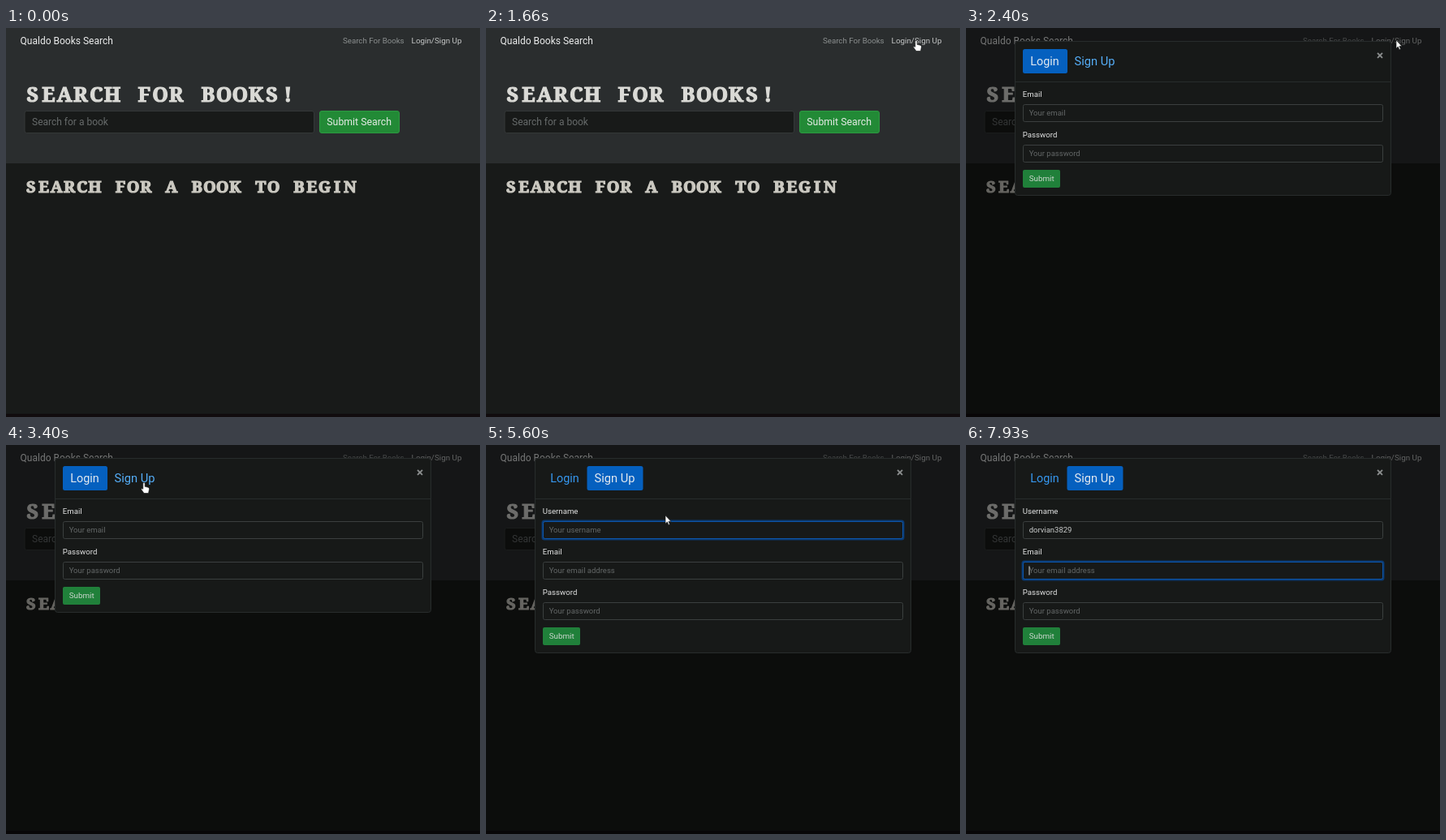
Write an HTML page that moves like this. It is 584 px wide and 480 px high and loops after 8000 ms.

```html
<!DOCTYPE html>
<html lang="en">
<head>
<meta charset="utf-8">
<title>Book search</title>
<style>
html, body { margin: 0; width: 100%; height: 100%; overflow: hidden; background: #181a19; }
svg { display: block; width: 584px; height: 480px; font: 9.5px Roboto, "Open Sans", sans-serif; }
text { white-space: pre; }
.slab { font-family: "Noto Serif", serif; font-weight: 900; text-anchor: middle; stroke-width: 1.2; }
.label { fill: #e2e3e3; font-size: 9.65px; }
.hint { fill: #636767; }
.field { fill: #171918; stroke: #3b3f3f; }
.pill { font-size: 14.4px; }

/* One shared 8 s clock */
.a { animation: 8s linear infinite; }
.fade { animation-name: fade; }
.drop { animation-name: drop; }
.leave { animation-name: leave; }
.enter { animation-name: enter; }
.before { animation-name: before; }
.after { animation-name: after; }
.short { animation-name: short; }
.tall { animation-name: tall; }
.focus1 { animation-name: focus1; }
.focus2 { animation-name: focus2; }
.move { animation-name: move; }
.arrow { animation-name: arrow; animation-timing-function: step-end; }
.hand { animation-name: hand; animation-timing-function: step-end; }

@keyframes fade { 0%, 21.25% { opacity: 0 } 23.125%, 100% { opacity: 1 } }
@keyframes drop {
  0%, 21.25% { transform: translateY(-31px); animation-timing-function: ease-out }
  25%, 100% { transform: none }
}
@keyframes before { 0%, 47.5% { opacity: 1 } 47.501%, 100% { opacity: 0 } }
@keyframes after { 0%, 47.5% { opacity: 0 } 47.501%, 100% { opacity: 1 } }
@keyframes short { 0%, 49.375% { opacity: 1 } 49.376%, 100% { opacity: 0 } }
@keyframes tall { 0%, 49.375% { opacity: 0 } 49.376%, 100% { opacity: 1 } }
@keyframes leave { 0%, 47.5% { opacity: 1 } 49.375%, 100% { opacity: 0 } }
@keyframes enter { 0%, 49.375% { opacity: 0 } 51.25%, 100% { opacity: 1 } }
@keyframes focus1 { 0%, 62.5% { opacity: 0 } 64.375%, 95% { opacity: 1 } 96.875%, 100% { opacity: 0 } }
@keyframes focus2 { 0%, 95% { opacity: 0 } 96.875%, 100% { opacity: 1 } }
@keyframes move {
  0%, .75% { transform: translate(440px, 140px); animation-timing-function: ease-in-out }
  10.75%, 11.625% { transform: translate(532px, 97px); animation-timing-function: ease-in-out }
  18.25%, 30% { transform: translate(530px, 15px); animation-timing-function: ease-in-out }
  40.75%, 53.75% { transform: translate(170px, 46px); animation-timing-function: ease-in }
  58% { transform: translate(160px, 94px) }
  69.5% { transform: translate(221px, 94px) }
  70.75%, 92.5% { transform: translate(221px, 76.5px) }
  94.1%, 100% { transform: translate(222px, 95px) }
}
@keyframes arrow {
  0% { opacity: 0 } .75% { opacity: 1 } 17.5% { opacity: 0 } 23.125% { opacity: 1 }
  39.4% { opacity: 0 } 55.5% { opacity: 1 } 58% { opacity: 0 } 69.5% { opacity: 1 }
  94.1%, 100% { opacity: 0 }
}
@keyframes hand {
  0% { opacity: 0 } 17.5% { opacity: 1 } 23.125% { opacity: 0 }
  39.4% { opacity: 1 } 55.5%, 100% { opacity: 0 }
}
</style>
</head>
<body>
<svg viewBox="0 0 584 480">
  <defs>
    <g id="submit">
      <rect x="70" width="46" height="22" rx="2" fill="#20803a"/>
      <text x="77.7" y="14.2" font-size="9.8" fill="#cbd5cd">Submit</text>
    </g>
    <g id="ring" fill="none">
      <rect x="69.5" y="-.5" width="445" height="23" rx="2.5" stroke="#0a3a73" stroke-width="2"/>
      <rect x="70.5" y=".5" width="443" height="21" rx="2" stroke="#0d55a8"/>
    </g>
  </defs>

  <rect width="584" height="480" fill="#181a19"/>
  <rect width="584" height="167" fill="#2a2d2e"/>
  <rect y="476" width="584" height="4" fill="#110c0e"/>
  <text x="17.6" y="20.4" font-size="12" fill="#eceded">Qualdo Books Search</text>
  <text x="415" y="19.3" font-size="9.7" fill="#8b8f8f">Search For Books</text>
  <text x="499.6" y="19.3" font-size="9.85" fill="#c6c8c8">Login/Sign Up</text>
  <text class="slab" y="90.6" font-size="25" fill="#dadad6" stroke="#dadad6">SEARCH FOR BOOKS!</text>
  <rect x="23" y="102.5" width="356.5" height="27" rx="2.5" fill="#181a19" stroke="#343838"/>
  <text x="32" y="120.4" font-size="12" fill="#676b6b">Search for a book</text>
  <rect x="386.5" y="102.5" width="98" height="27" rx="2.5" fill="#228a36" stroke="#2d9b42"/>
  <text x="395.3" y="120.4" font-size="12.3" fill="#e6ece7">Submit Search</text>
  <text class="slab" y="202.6" font-size="20" fill="#cbc9c1" stroke="#cbc9c1">SEARCH FOR A BOOK TO BEGIN</text>

  <rect id="shade" class="a fade" width="584" height="480" fill-opacity=".5"/>

  <g class="a fade"><g class="a drop">
    <g fill="#171918" stroke="#282c2c">
      <rect class="a short" x="60.5" y="16.5" width="463" height="190" rx="3"/>
      <rect class="a tall" x="60.5" y="16.5" width="463" height="240" rx="3"/>
      <path d="M61 66.5H523"/>
    </g>
    <path d="M507 30.8l6 6m0-6l-6 6" stroke="#8c8f8f" stroke-width="1.9"/>

    <g class="a before pill">
      <rect x="70" y="26" width="55" height="30" rx="2.5" fill="#0560bf"/>
      <text x="79.3" y="46" fill="#e3e9f0">Login</text>
      <text x="133.5" y="46" font-size="14.7" fill="#55aef8">Sign Up</text>
    </g>
    <g class="a after pill">
      <rect x="124.5" y="26" width="69" height="30" rx="2.5" fill="#0560bf"/>
      <text x="79.3" y="46" fill="#3698f0">Login</text>
      <text x="133.5" y="46" font-size="14.7" fill="#e3e9f0">Sign Up</text>
    </g>

    <g id="login" class="a leave"><use href="#submit" y="175"/></g>
    <g id="signup" class="a enter"><use href="#submit" y="225"/></g>
    <g class="a focus1"><use href="#ring" y="94"/></g>
    <g class="a focus2"><use href="#ring" y="144"/></g>
    <text id="typed" x="77.7" y="108.4" fill="#c9cbcb"></text>
    <rect id="caret" width="1" height="11" fill="#d8dada"/>
  </g></g>

  <g class="a move" stroke="#101212" stroke-width=".6" fill="#fff">
    <path class="a arrow" d="M0 0V10.2L2.3 8.1 3.9 11.7 5.5 11 3.9 7.5H7Z"/>
    <path class="a hand" d="M-1.2 1Q0-.6 1.2 1V5.3L5.2 6.3Q6.8 6.9 6.5 8.6L5.5 13.5H0L-3.4 8.7Q-3.4 7-1.2 8.3Z"/>
  </g>
</svg>
<script>
const $ = id => document.getElementById(id);

// Headings sit on a fixed pitch, one letter centred in each cell
document.querySelectorAll('.slab').forEach(el => {
  const pitch = el.getAttribute('font-size') * .786;
  el.setAttribute('x', [...el.textContent].map((_, i) => (23 + pitch * (i + .5)).toFixed(2)).join(' '));
});

function addFields(id, rows) {
  const html = rows.map(([label, hint], i) => {
    const y = 94 + 50 * i;
    return `<text class="label" x="69.8" y="${y - 8.6}">${label}</text>
      <rect class="field" x="70.5" y="${y + .5}" width="443" height="21" rx="2"/>
      <text class="hint" x="77.7" y="${y + 14.4}">${hint}</text>`;
  }).join('');
  $(id).insertAdjacentHTML('afterbegin', html);
}
addFields('login', [['Email', 'Your email'], ['Password', 'Your password']]);
addFields('signup', [['Username', 'Your username'], ['Email', 'Your email address'], ['Password', 'Your password']]);

const name = 'dorvian3829';
const keys = [5660, 5730, 5860, 6060, 6130, 6260, 6400, 7000, 7060, 7130, 7200];
const focusAt = 5000, tabAt = 7600;
const typed = $('typed'), caret = $('caret');
const userHint = document.querySelector('#signup .hint');
const clock = $('shade').getAnimations()[0];

function draw() {
  const t = (clock.currentTime || 0) % 8000;
  const count = keys.filter(k => k <= t).length;
  typed.textContent = name.slice(0, count);
  userHint.style.opacity = count ? 0 : 1;

  const inEmail = t >= tabAt;
  const last = inEmail ? tabAt : count ? keys[count - 1] : focusAt;
  const on = t >= focusAt && (t - last) % 1000 < 500;
  caret.style.opacity = on ? 1 : 0;
  caret.setAttribute('x', 77.5 + (inEmail || !count ? 0 : typed.getComputedTextLength()));
  caret.setAttribute('y', inEmail ? 149.5 : 99.5);
  requestAnimationFrame(draw);
}
draw();
</script>
</body>
</html>
```
